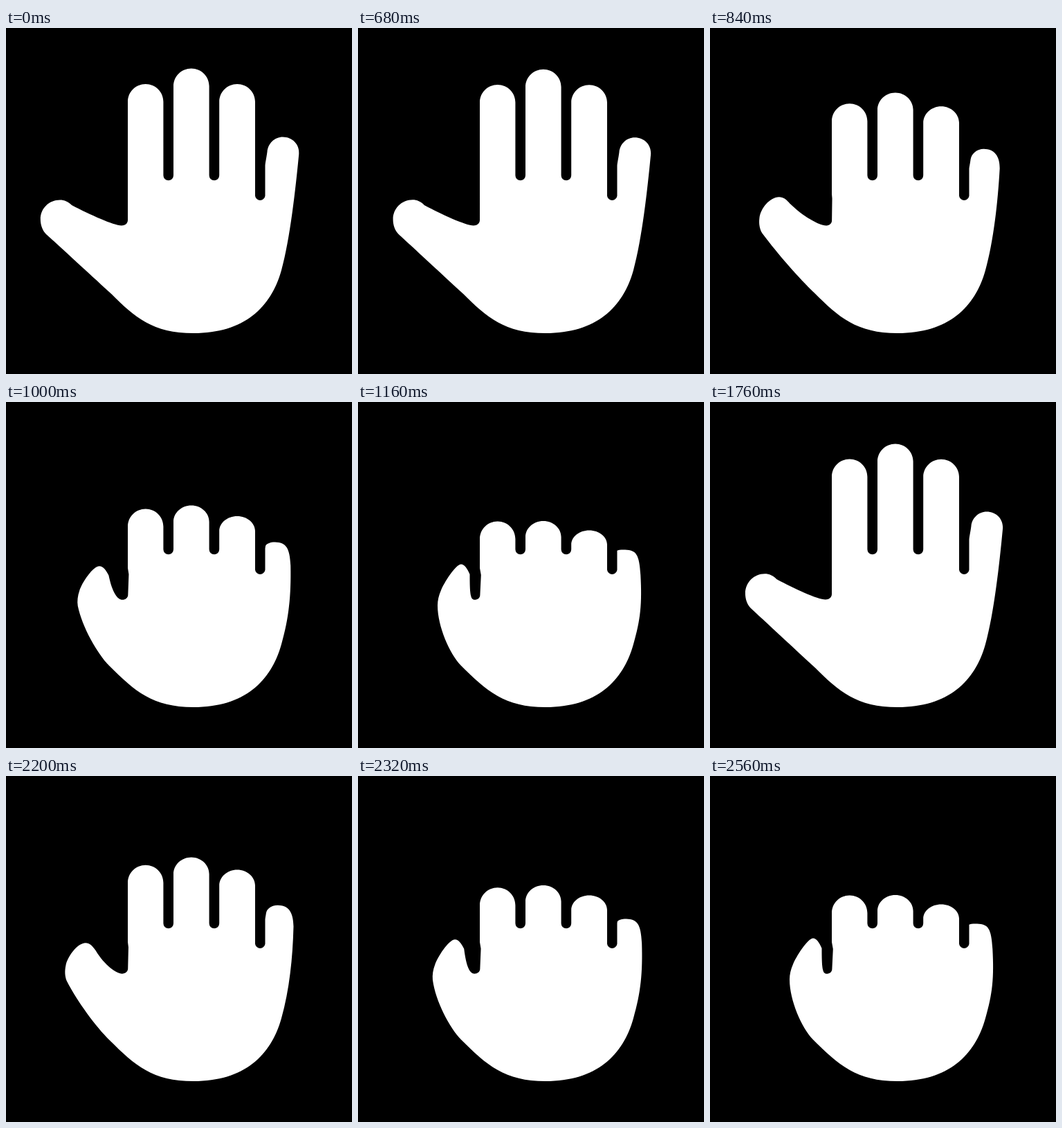
These frames come from a looping animation (500x500 px, 2.68 s). An HTML page:

```html
<!DOCTYPE html>
<html lang="en">
<head>
<meta charset="utf-8">
<title>Hand</title>
<style>
  html, body { margin: 0; width: 100%; height: 100%; overflow: hidden; background: #000; }
  svg { display: block; width: 100%; height: 100%; }
</style>
</head>
<body>
<svg viewBox="0 0 500 500"><path id="hand" fill="#fff"/></svg>
<script>
const LOOP = 2680, STEP = 40;
const hand = document.getElementById('hand');

function bezierEase(x1, y1, x2, y2) {
  const axis = (a, b, t) => 3 * a * t * (1 - t) ** 2 + 3 * b * t * t * (1 - t) + t ** 3;
  return x => {
    if (x <= 0 || x >= 1) return Math.min(1, Math.max(0, x));
    let lo = 0, hi = 1;
    for (let i = 0; i < 30; i++) {
      const mid = (lo + hi) / 2;
      if (axis(x1, x2, mid) < x) lo = mid; else hi = mid;
    }
    return axis(y1, y2, lo);
  };
}
const smooth = bezierEase(.42, 0, .58, 1);
const snappy = bezierEase(.03, 1, .7, 1);

// 0 is the open hand, 1 the closed fist
function closure(ms) {
  if (ms < 1360) return smooth((ms - 640) / 520);
  if (ms < 2160) return 1 - snappy((ms - 1360) / 560);
  return snappy((ms - 2160) / 400);
}

function handPath(p) {
  const mix = (open, closed) => open + (closed - open) * p;
  const pt = (x, y, cx = x, cy = y) => `${mix(x, cx).toFixed(2)} ${mix(y, cy).toFixed(2)} `;
  const curve = (...points) => 'C' + points.join('');
  const finger = (left, right, tip, shoulder) => {
    const mid = (left + right) / 2, bend = tip + (shoulder - tip) * .45;
    return `V${shoulder}C${left} ${bend} ${mid - 14.2} ${tip} ${mid} ${tip}` +
           `S${right} ${bend} ${right} ${shoulder}`;
  };
  const slot = (right, y) => `V${y}A7.3 7.3 0 0 0 ${right} ${y}`;

  const fingers =
    finger(176, 227.4, mix(81, 172.5), mix(106.5, 198)) + slot(242, 213) +
    finger(242, 293.6, mix(58.5, 172), mix(84, 195)) + slot(308.2, 213) +
    finger(308.2, 360, mix(81, 185.5), mix(106.5, 206)) + slot(374.5, 242.5);

  const pinky =
    'L' + pt(374.5, 200, 374.5, 215) +
    curve(pt(374.5, 195, 374.5, 215), pt(376.2, 189, 374.5, 215), pt(377.5, 179, 374.5, 214.8)) +
    curve(pt(378.5, 167, 376, 213.5), pt(388, 157.5, 382, 213.3), pt(400, 157.5, 386, 213.5)) +
    curve(pt(414, 157.5, 402, 214), pt(424.5, 168.5, 406.5, 220), pt(423.3, 182, 408.3, 250));

  const palm =
    curve(pt(418.5, 232, 410.5, 292), pt(410.5, 305, 408.5, 314), pt(398, 350)) +
    curve(pt(383, 404), pt(344, 441), pt(271, 441)) +
    curve(pt(212, 441), pt(186, 418), pt(152, 384, 148, 380));

  const thumb =
    curve(pt(128, 362, 133, 364), pt(90, 327, 115, 325), pt(58, 298, 115, 294)) +
    curve(pt(52.5, 292.5, 115, 287), pt(49.8, 284.5, 116.8, 279), pt(49.8, 276.3, 120, 272)) +
    curve(pt(49.8, 261, 124, 262), pt(62, 248.5, 141, 234.5), pt(78, 248.5, 149, 234.5)) +
    curve(pt(84.5, 248.5, 154, 234.5), pt(90, 251, 158, 241), pt(95, 256, 161.5, 249)) +
    curve(pt(122, 270, 161.5, 277), pt(155, 285, 162.5, 285.8), pt(167, 285.5, 168.5, 285.8)) +
    curve(pt(172, 285.5, 173, 285.8), pt(176, 282.5, 176.3, 283), pt(176, 277.5, 176.4, 279));

  const crease = 'L' + pt(176, 245, 177.8, 250) + 'L' + pt(176, 240);
  return 'M' + pt(176, 240) + fingers + pinky + palm + thumb + crease + 'Z';
}

const start = performance.now();
function draw(now) {
  const ms = Math.max(0, now - start) % LOOP;
  const stepped = Math.floor((ms + .5) / STEP) * STEP % LOOP;
  hand.setAttribute('d', handPath(closure(stepped)));
  requestAnimationFrame(draw);
}
draw(start);
</script>
</body>
</html>
```
